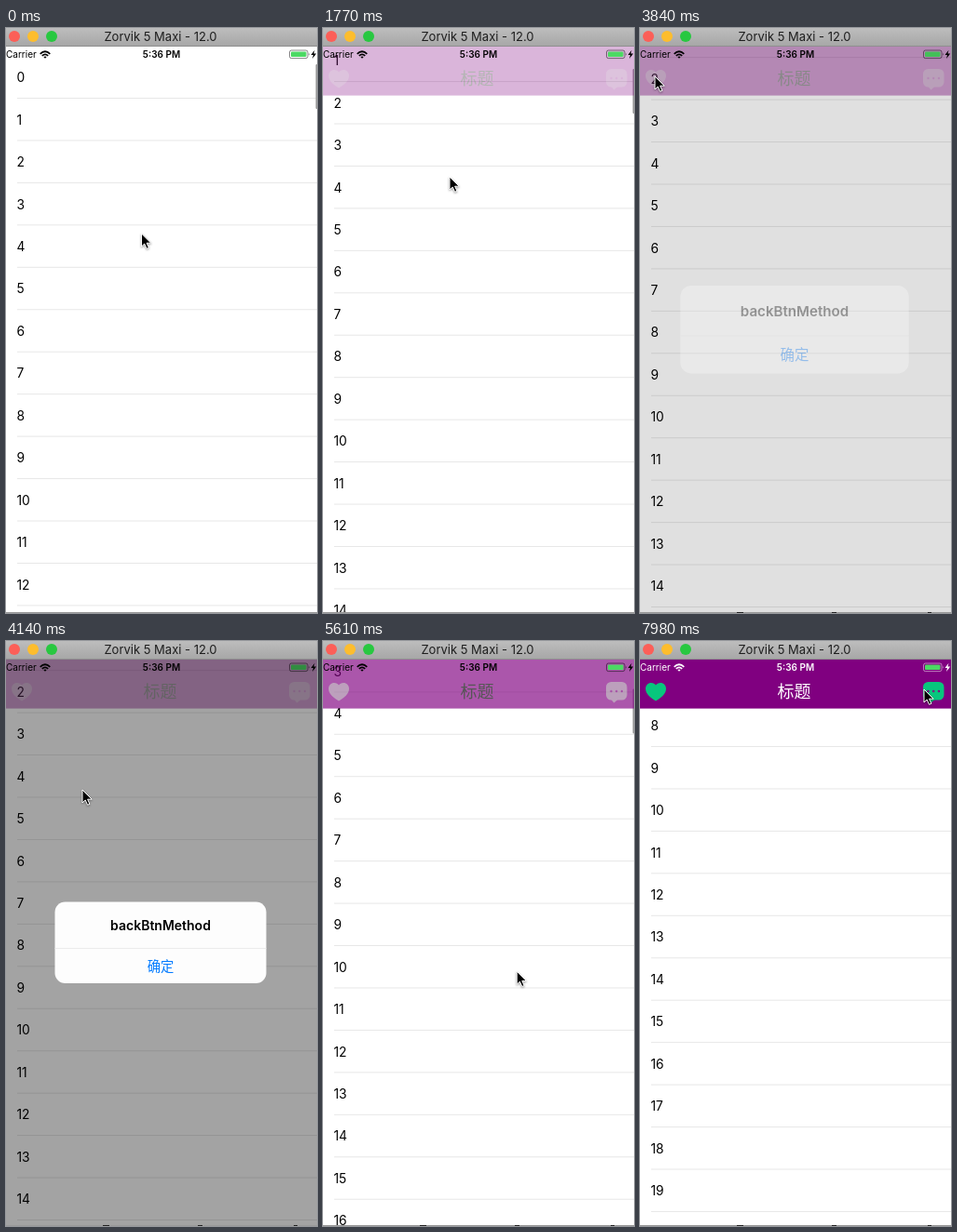
Animation of 334x629 px, one loop 8 s. Source, as an HTML page:

```html
<!DOCTYPE html>
<html lang="zh">
<head>
<meta charset="utf-8">
<title>Fading navigation bar</title>
<style>
  html, body { margin: 0; width: 100%; height: 100%; overflow: hidden; background: #fff; }
  svg { display: block; font-family: Inter, "Noto Sans CJK SC", "Noto Sans CJK", sans-serif; }
  .mid { text-anchor: middle; }
  .cjk { font-family: "Noto Sans CJK SC", "Noto Sans CJK", sans-serif; }
</style>
</head>
<body>
<svg width="334" height="629" viewBox="0 0 334 629">
  <defs>
    <linearGradient id="chrome" x2="0" y2="1">
      <stop stop-color="#bdbdbd"/><stop offset="1" stop-color="#a6a6a6"/>
    </linearGradient>
  </defs>
  <rect width="334" height="629" fill="#fff"/>
  <g id="rows" font-size="13.8"></g>
  <rect id="thumb" x="332.6" width="2" height="48" rx="1" fill="#999"/>

  <g id="nav">
    <rect y="20" width="334" height="52.6" fill="#800080"/>
    <text id="title" class="mid cjk" x="165.5" y="61" font-size="18">标题</text>
    <g id="icons">
      <path d="M17 64.5C12 61.5 6 57 6 51.5C6 47.5 8.8 45 12 45C14.2 45 16 46 17 47.5C18 46 19.8 45 22 45C25.2 45 28 47.5 28 51.5C28 57 22 61.5 17 64.5Z"/>
      <rect x="304" y="44" width="22.5" height="19.5" rx="5.5"/>
      <path d="M309.5 63L312.5 66.5L316.5 63Z"/>
      <path d="M309.5 54h.01m5.7 0h.01m5.7 0h.01" stroke="#800080" stroke-width="2.4" stroke-linecap="round"/>
    </g>
  </g>

  <g id="status" font-size="10">
    <text x="0" y="32">Carrier</text>
    <g transform="translate(42 32.5)" fill="none" stroke="currentColor" stroke-width="1.7">
      <path d="M-5.3 -4.7Q0 -9.8 5.3 -4.7M-3.2 -2.6Q0 -5.6 3.2 -2.6"/>
      <path d="M0 .3L-1.7 -1.4Q0 -2.7 1.7 -1.4Z" fill="currentColor" stroke="none"/>
    </g>
    <text class="mid" x="167" y="32" font-weight="600">5:36 PM</text>
    <rect x="304.5" y="24" width="19.5" height="8.6" rx="2" fill="none" stroke="currentColor" stroke-width=".8" opacity=".6"/>
    <rect x="306" y="25.5" width="16.5" height="5.6" rx="1" fill="#4cd964"/>
    <path d="M325 26.8Q326.5 28.3 325 29.8Z" opacity=".6"/>
    <path d="M331.5 23.7L327.5 29H330L329 33L333.2 27.6H330.5Z"/>
  </g>

  <rect id="dim" y="20" width="334" height="609"/>
  <g id="alert">
    <rect id="panel" x="52.5" y="280.5" width="227" height="87.5" rx="11"/>
    <g id="message" class="mid">
      <rect x="52.5" y="330" width="227" height=".8" fill="#e8e8e8"/>
      <text x="166" y="311" font-size="14" font-weight="600">backBtnMethod</text>
      <text class="cjk" x="166" y="355" font-size="14.3" font-weight="500" fill="#007aff">确定</text>
    </g>
  </g>

  <rect width="334" height="20" fill="url(#chrome)"/>
  <rect y="19" width="334" height="1" fill="#8f8f8f"/>
  <circle cx="9" cy="9" r="6" fill="#fc5f58"/>
  <circle cx="29" cy="9" r="6" fill="#fdbd2e"/>
  <circle cx="49" cy="9" r="6" fill="#28c840"/>
  <text class="mid" x="166" y="14" font-size="13" fill="#1e1e1e">Zorvik 5 Maxi - 12.0</text>
  <rect y="628" width="334" height="1" fill="#999"/>
  <path id="marks" d="M104 628.5h7M206 628.5h5M309 628.5h4" stroke="#222"/>

  <path id="cursor" d="M0 0V14L3.2 11L5.6 16.3L7.9 15.3L5.6 10.2H10.2Z" stroke="#fff" style="filter:drop-shadow(0 1px 1px #0006)"/>
</svg>
<script>
const LOOP = 8000, STEP = 147.7, PITCH = 45.45;
const el = Object.fromEntries([...document.querySelectorAll('[id]')].map(e => [e.id, e]));

// Pointer gestures in steps; a pull also scrolls the list and slows to a stop
const gestures = [
  { from: 0, to: 12, x: 136, y: 160, pull: 63.4 },
  { from: 13, to: 16, x: 130, y: 402 },
  { from: 16, to: 19, x: 127, y: 376, pull: 25.9 },
  { from: 21, to: 25, x: 16, y: 52 },
  { from: 26, to: 28, x: 82, y: 160 },
  { from: 28, to: 30, x: 168, y: 363 },
  { from: 33, to: 36, x: 205, y: 423 },
  { from: 36, to: 45, x: 211, y: 295, pull: 127.9 },
  { from: 45, to: 50, x: 213, y: 187, pull: 108.4 },
  { from: 50, to: 54, x: 305, y: 52 },
];

const ramp = (k, from, to) => Math.max(0, Math.min(1, (k - from) / (to - from)));
const easeOut = p => 1 - (1 - p) ** 3;

function pointerAt(k) {
  let x = 145.5, y = 221, scroll = 0;
  for (const g of gestures) {
    const p = ramp(k, g.from, g.to), q = g.pull ? easeOut(p) : p;
    x += (g.x - x) * q;
    y += (g.y - y) * q;
    scroll += (g.pull || 0) * q;
  }
  return { x, y, scroll };
}

function set(node, attrs) {
  for (const name in attrs) node.setAttribute(name, attrs[name]);
}

function add(parent, tag, attrs, text = '') {
  const node = document.createElementNS('http://www.w3.org/2000/svg', tag);
  set(node, attrs);
  node.textContent = text;
  parent.append(node);
}

for (let n = 0; n < 22; n++) {
  const y = n * PITCH;
  add(el.rows, 'text', { x: 11.5, y: 58.2 + y }, n);
  add(el.rows, 'rect', { x: 12, y: 75 + y, width: 322, height: 1, fill: '#e7e7e7' });
}

function drawList(k, scroll) {
  const alpha = Math.min(1, (scroll + 8) / 250, scroll / 50);
  const solid = alpha === 1;
  const ink = solid ? '#fff' : '#000';
  const scrolling = k < 22 || (k > 35 && k < 53);

  set(el.rows, { transform: `translate(0 ${-scroll})` });
  set(el.thumb, { y: 39 + scroll * .079, opacity: +scrolling });
  set(el.nav, { opacity: alpha });
  set(el.title, { fill: ink });
  set(el.icons, { opacity: alpha, fill: solid ? '#08c67d' : '#aaa' });
  set(el.status, { fill: ink, color: ink });
}

function drawAlert(k) {
  const open = ramp(k, 25, 28), close = ramp(k, 31, 33);
  const grey = 253 - 7 * close, scale = 1.12 - .12 * open - .02 * close;

  set(el.dim, { opacity: .36 * open * (1 - close) });
  set(el.alert, {
    opacity: k > 33 ? 0 : open,
    transform: `translate(166 324) scale(${scale}) translate(-166 -324)`,
  });
  set(el.panel, { fill: `rgb(${grey},${grey},${grey})` });
  set(el.message, { opacity: 1 - .92 * close });
}

function draw(ms) {
  const k = Math.floor((ms + 4) / STEP);
  const { x, y, scroll } = pointerAt(k);
  drawList(k, scroll);
  drawAlert(k);
  set(el.marks, { opacity: k < 22 ? 0 : 1 });
  set(el.cursor, { transform: `translate(${x} ${y})` });
}

const start = performance.now();
function tick() {
  draw((performance.now() - start) % LOOP);
  requestAnimationFrame(tick);
}
tick();
</script>
</body>
</html>
```
